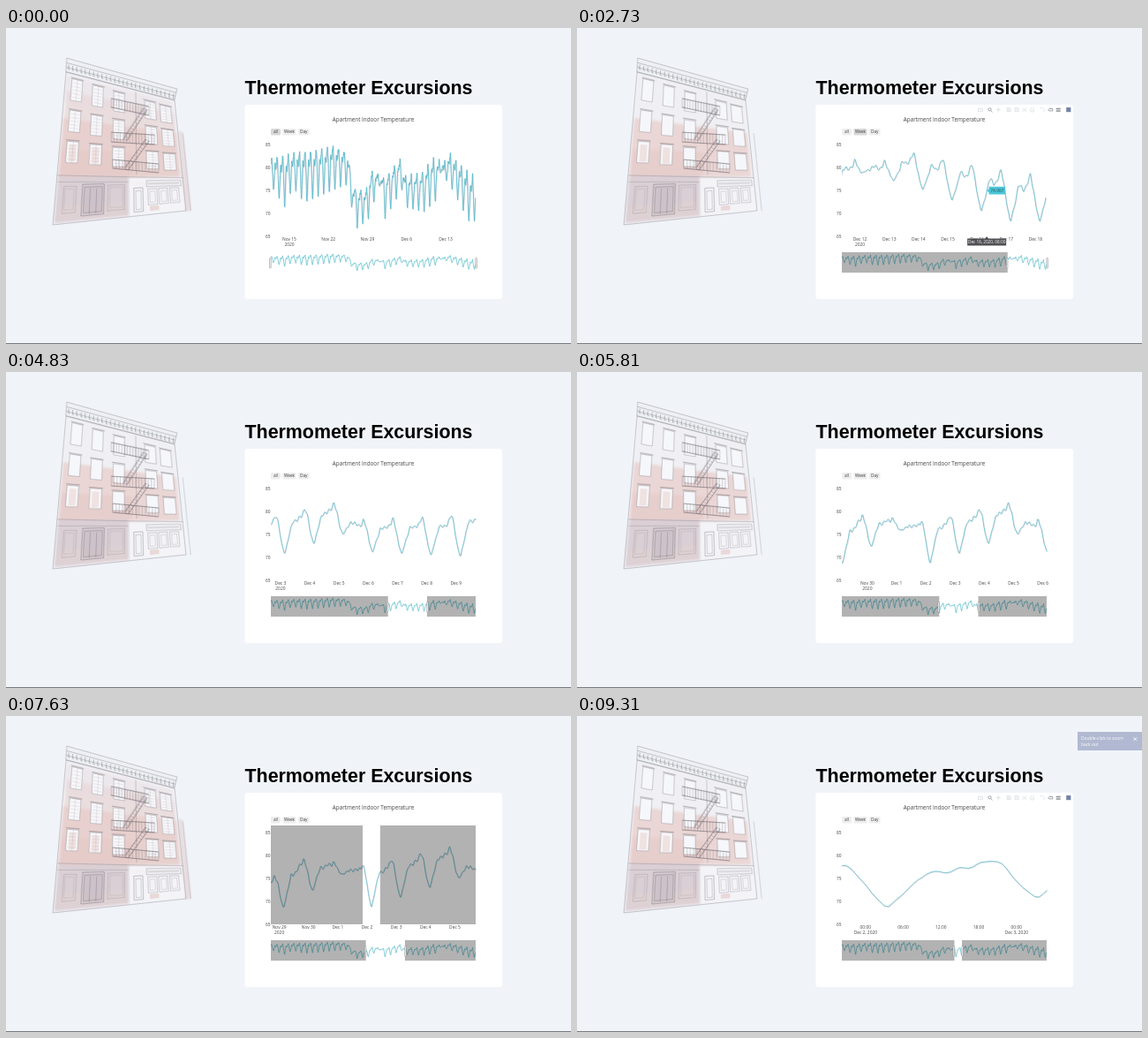
An HTML page for the animation above (9.38 s loop, 640 by 358 pixels).

```html
<!DOCTYPE html>
<html lang="en">
<head>
<meta charset="utf-8">
<title>Indoor temperature</title>
<style>
html, body { margin: 0; width: 100%; height: 100%; overflow: hidden; background: #f0f4f9; }
svg { display: block; width: 100%; height: 100%; }
text { font-family: "Open Sans", sans-serif; }
.head { font: bold 21.4px "Liberation Sans", Arial, sans-serif; }
.line { fill: none; vector-effect: non-scaling-stroke; stroke-linejoin: round; }
</style>
</head>
<body>
<svg id="stage" viewBox="0 0 640 358">
  <defs>
    <clipPath id="plotClip"><rect x="300" y="124" width="232.5" height="112"/></clipPath>
    <clipPath id="miniClip"><rect x="300" y="253" width="232.5" height="25"/></clipPath>
    <filter id="soft" x="-10%" y="-10%" width="120%" height="120%"><feGaussianBlur stdDeviation="1.4"/></filter>
  </defs>
</svg>
<script>
const LOOP = 9380, STEP = 70;
const L = 300, W = 232, DAYS = 36.7, MINI = W / DAYS;
const SUNDAY = 3.32, SUNDAY_MS = Date.UTC(2020, 10, 15), MINUTE = 6e4;
const stage = document.getElementById('stage');

function set(el, attrs) { for (const k in attrs) el.setAttribute(k, attrs[k]); }
function add(parent, tag, attrs = {}, text) {
  const el = document.createElementNS('http://www.w3.org/2000/svg', tag);
  set(el, attrs);
  if (text !== undefined) el.textContent = text;
  return parent.appendChild(el);
}
const show = (el, on) => { el.style.display = on ? '' : 'none'; };
const group = (parent, attrs) => add(parent, 'g', attrs);
const rect = (parent, x, y, width, height, fill, more) =>
  add(parent, 'rect', { x, y, width, height, fill, ...more });
const label = (parent, x, y, text, size = 4.9, fill = '#444', anchor = 'middle') =>
  add(parent, 'text', { x, y, 'font-size': size, fill, 'text-anchor': anchor }, text);
const mix = (a, b, k) => a + (b - a) * k;
const ramp = (t, from, to) => Math.min(1, Math.max(0, (t - from) / (to - from)));
function along(keys, x) {
  const i = Math.max(1, keys.findIndex(k => x <= k[0]));
  if (x > keys[keys.length - 1][0]) return keys[keys.length - 1][1];
  const [a, b] = [keys[i - 1], keys[i]];
  return mix(a[1], b[1], ramp(x, a[0], b[0]));
}
let seed = 7;
const rnd = () => (seed = (seed * 16807) % 2147483647) / 2147483647;

// Temperature: a daily swing between a slow low and a slow high
const LOW_HOUR = .46;
const lows = [[0, 75], [2, 71], [3.5, 75.5], [5.5, 72], [13, 76], [15, 66.5], [17, 68.5], [19, 76],
  [20, 68.5], [23, 75], [24, 71], [27, 70], [29, 72.3], [30, 79], [32, 75], [35, 68]];
const highs = [[0, 82], [11, 85], [13.8, 83.5], [14.6, 76], [17, 75.3], [18.1, 79.5], [20, 78],
  [21.2, 79.5], [23.1, 82], [24, 78], [27, 79], [28.9, 82], [31, 80.5], [32, 83], [36, 78]];
const swing = [[0, 0], [.17, .45], [.27, .78], [.44, .7], [.69, 1], [.8, .68], [.9, .28], [1, 0]];
function tempAt(d) {
  const day = d - LOW_HOUR, part = along(swing, day - Math.floor(day));
  const flicker = .5 * Math.sin(d * 19) + .4 * Math.sin(d * 43);
  return mix(along(lows, day), along(highs, d), part) + part * flicker;
}
const yAt = d => 236 - (tempAt(d) - 65) * 5.2;
const trace = 'M' + Array.from({ length: DAYS * 36 }, (_, i) =>
  (i / 36).toFixed(3) + ' ' + yAt(i / 36).toFixed(2)).join('L');

// Brownstone sketch, mapped on a leaning four-sided front
const house = group(stage);
const at = (u, v) => [mix(mix(68, 191, u), mix(53, 204, u), v), mix(mix(50, 82, u), mix(223, 207, u), v)];
const path = (...pts) => 'M' + pts.map(p => at(...p).map(n => n.toFixed(1)).join(' ')).join('L');
const quad = (u0, v0, u1, v1) => path([u0, v0], [u1, v0], [u1, v1], [u0, v1]) + 'Z';
const fill = (g, d, color, opacity = 1) => add(g, 'path', { d, fill: color, opacity });
function ink(g, d, width = .5, color = '#858088', opacity = .55) {
  for (let i = 0; i < 2; i++) add(g, 'path', {
    d, fill: 'none', stroke: color, 'stroke-width': width, opacity: opacity / (i + 1),
    transform: `translate(${(rnd() - .5) * i * 1.6} ${(rnd() - .5) * i * 1.6})`
  });
}
const seg = (x0, y0, x1, y1) => `M${x0} ${y0}L${x1} ${y1}`;

fill(house, 'M69 34L194 69L191 83L67 51Z', '#edf0f4');
fill(house, quad(0, 0, 1, 1), '#f0f0f4');
const base = group(house, { filter: 'url(#soft)' });
fill(base, quad(.01, .3, .98, .69), '#e9d0cd', .8);
fill(base, quad(.02, .5, .6, .68), '#e2c3c0', .45);
fill(base, quad(.01, .68, .57, .99), '#d8ced3', .95);
fill(base, quad(.03, .88, .55, .98), '#e2d1d0', .6);
const wash = group(house, { filter: 'url(#soft)' });
fill(wash, quad(.02, .12, .98, .69), '#e5c9c7', .5);
fill(wash, quad(.01, .02, .97, .2), '#e9dde0', .5);
fill(wash, 'M195 116L200 118L210 207L203 208Z', '#e6dadc', .9);
fill(wash, quad(.6, .72, .98, .8), '#e6d2d2', .4);

const panes = group(house), blinds = group(house), lines = group(house);
for (let row = 0; row < 3; row++) {
  for (const u0 of [.06, .25, .44, .72, .86]) {
    const u1 = u0 + .097, v0 = .03 + row * .208 + .05 * u0, v1 = v0 + .143;
    fill(panes, quad(u0, v0, u1, v1), '#f6f7fa');
    if (row === 2 && u0 < .3) fill(panes, quad(u0 + .02, v0 + .02, u1 - .02, v1 - .01), '#eddcda', .8);
    ink(panes, quad(u0, v0, u1, v1));
    ink(panes, path([u0 - .01, v0 - .008], [u1 + .01, v0 - .008]), .8);
    for (let k = 1; k < 6; k++) {
      const v = mix(v0, v1, k / 6);
      ink(blinds, path([u0 + .012, v], [u1 - .012, v]), .4, '#c4b3b7', .5);
    }
    ink(blinds, path([u0 + .05, v0], [u0 + .05, v1]), .4, '#c4b3b7', .6);
  }
}
// Cornice
for (let k = 0; k < 4; k++) {
  const y = 34 + k * 5.2;
  ink(lines, seg(69 - k * .4, y, 194 - k, y + 35 - k), .55);
}
for (let k = 0; k < 26; k++) ink(lines, `M${71 + k * 4.75} ${41.5 + k * 1.32}l-.6 5l1.8 .5`, .6, '#6f6b73', .5);
ink(lines, seg(69, 34, 68, 50) + seg(194, 69, 191, 82));
// Walls and street level
ink(lines, quad(0, 0, 1, 1));
ink(lines, seg(200, 119, 209, 207), .4);
ink(lines, path([0, .675], [.57, .69], [1, .7]));
ink(lines, path([.01, .72], [.57, .73]), .4);
fill(lines, quad(.58, .71, .99, .99), '#f5f6f9', .8);
const frame = (u0, v0, u1, v1, width) => {
  ink(lines, quad(u0, v0, u1, v1), width);
  ink(lines, quad(u0 + .015, v0 + .02, u1 - .015, v1 - .02), width * .7);
};
fill(lines, quad(.22, .75, .37, .95), '#c9bec5', .8);
frame(.21, .74, .38, .96, .8);
ink(lines, path([.27, .77], [.27, .95]) + path([.32, .77], [.32, .95]), .6);
frame(.06, .75, .16, .93, .35);
frame(.41, .75, .54, .94, .35);
frame(.61, .78, .68, .97, .6);
frame(.71, .72, .98, .77, .5);
for (let k = 0; k < 3; k++) frame(.72 + k * .085, .79, .79 + k * .085, .92, .45);
fill(lines, quad(.73, .93, .8, .97), '#e6d2d0', .8);
// Fire escape
const iron = '#68636b';
function ladder(n, x0, y0, x1, y1, dx, dy) {
  ink(lines, seg(x0, y0, x1, y1) + seg(x0 + dx, y0 + dy, x1 + dx, y1 + dy), .7, iron, .65);
  for (let k = 0; k <= n; k++) {
    const x = mix(x0, x1, k / n), y = mix(y0, y1, k / n);
    ink(lines, seg(x, y, x + dx, y + dy), .35, iron, .5);
  }
}
ladder(14, 119, 80, 162, 89, 0, 10);
ladder(14, 119, 118, 168, 121, 0, 11);
ladder(14, 121, 149, 173, 154, 0, 10);
ladder(11, 156, 91, 133, 126, 4, 2);
ladder(11, 158, 126, 134, 159, 4, 2);
ink(lines, seg(147, 72, 148, 166), .4, iron, .5);

// Card
add(stage, 'text', { x: 270.5, y: 75, class: 'head', fill: '#000' }, 'Thermometer Excursions');
rect(stage, 270.5, 87, 291.5, 220, '#fff', { rx: 3 });
label(stage, 416, 105.6, 'Apartment Indoor Temperature', 6.3);
const buttons = [['all', 300, 11], ['Week', 313.5, 15], ['Day', 331, 12.5]].map(([name, x, w]) => {
  const back = rect(stage, x, 114, w, 7.4, '#eee', { rx: 1.2 });
  label(stage, x + w / 2, 119.4, name, 4.8);
  return back;
});
for (let v = 65; v <= 85; v += 5) label(stage, 299.5, 237.8 - (v - 65) * 5.2, v, 4.8, '#444', 'end');

const plot = group(stage, { 'clip-path': 'url(#plotClip)' });
const glow = add(plot, 'path', { d: trace, class: 'line', stroke: '#e2dbe4', 'stroke-width': 1.2 });
const main = add(plot, 'path', { d: trace, class: 'line', stroke: '#4fbacb' });
const mini = group(stage, { 'clip-path': 'url(#miniClip)' });
add(mini, 'path', {
  d: trace, class: 'line', stroke: '#4fb8c9', 'stroke-width': .75,
  transform: `matrix(${MINI} 0 0 .205 ${L} ${254 - 124 * .205})`
});
const shade = (y, h) => [0, 1].map(() => rect(stage, L, y, 0, h, '#000', { opacity: .3 }));
const miniShade = shade(254, 23.2), plotShade = shade(124, 112);
function cover(pair, x0, x1) {
  set(pair[0], { width: Math.max(0, x0 - L) });
  set(pair[1], { x: x1, width: Math.max(0, L + W - x1) });
}
const grips = [0, 1].map(() =>
  rect(stage, 0, 260.5, 1.6, 11.5, '#fff', { rx: .6, stroke: '#777', 'stroke-width': .5 }));
const ticks = Array.from({ length: 9 }, () => [label(stage, 0, 241.4, ''), label(stage, 0, 247, '')]);

// Mode bar
const bar = group(stage, { fill: 'none', 'stroke-width': .8 });
const icon = (x, d, on) => add(bar, 'path', { d, transform: `translate(${x} 92.7)`, stroke: on ? '#8b8f95' : '#d9dbdf' });
const box = 'M-2 -2H2V2H-2Z', dash = 'M-1.2 0H1.2', plus = dash + 'M0 -1.2V1.2';
icon(457, 'M-2.4 -1.6H2.4V2H-2.4ZM-.6 .2H.6');
icon(468, 'M1.1 -.4A1.6 1.6 0 1 1 -2.1 -.4A1.6 1.6 0 1 1 1.1 -.4M.6 .8L2.5 2.6', true);
icon(477.3, 'M-2.6 0H2.6M0 -2.6V2.6');
icon(489, box + plus);
icon(498, box + dash);
icon(506.8, 'M-2.2 -2.2L2.2 2.2M2.2 -2.2L-2.2 2.2');
icon(515.5, 'M-2.5 .2L0 -2.2L2.5 .2M-1.6 0V2.2H1.6V0');
icon(527, 'M-2 -2H.5M2 -1V2');
icon(536.3, 'M-2.5 0L-1.5 -1.2H2.5V1.2H-1.5Z', true);
icon(545.2, 'M-2.5 -1.2H2.5M-2.5 1.3H2.5', true).setAttribute('stroke-width', 1.5);
rect(bar, 554.2, 90, 5.2, 5.2, '#7484a8');

// Hover labels
const hover = group(stage);
const tip = group(hover);
add(tip, 'path', { d: 'M0 0L2.4 -2V-4.4H21V4.4H2.4V2Z', fill: '#4cc6d7' });
const tipText = label(tip, 11.8, 1.8, '', 4.9, '#28505a');
const axisTip = group(hover);
add(axisTip, 'path', { d: 'M0 236.3L2 238.6H22V246.4H-22V238.6H-2Z', fill: '#505054' });
const axisText = label(axisTip, 0, 244.3, '', 4.7, '#fff');

const toast = group(stage);
rect(toast, 567, 18, 73, 21, '#b1b9d2');
label(toast, 571, 26.6, 'Double-click to zoom', 4.9, '#fff', 'start');
label(toast, 571, 33.8, 'back out', 4.9, '#fff', 'start');
add(toast, 'path', { d: 'M630.6 24.4l3.4 3.4m0 -3.4l-3.4 3.4', stroke: '#fff', 'stroke-width': 1 });
rect(stage, 0, 357, 640, 1, '#77797d');

const clock = d => new Date(SUNDAY_MS + Math.round((d - SUNDAY) * 1440) * MINUTE);
const dayName = c => `${c.getUTCMonth() === 10 ? 'Nov' : 'Dec'} ${c.getUTCDate()}`;
const hour = c => String(c.getUTCHours()).padStart(2, '0') + ':00';

function drawTicks(a, b) {
  const span = b - a, step = span > 10 ? 7 : span > 2 ? 1 : .25, fine = step < 1;
  const first = Math.ceil((a - SUNDAY) / step - 1e-6);
  ticks.forEach(([top, low], i) => {
    const d = SUNDAY + (first + i) * step, c = clock(d), x = L + (d - a) / span * W;
    set(top, { x });
    set(low, { x });
    show(top, d <= b);
    show(low, d <= b && (i === 0 || fine && c.getUTCHours() === 0));
    top.textContent = fine ? hour(c) : dayName(c);
    low.textContent = fine ? dayName(c) + ', 2020' : '2020';
  });
}

function draw(t) {
  const within = (from, to) => t > from && t < to;
  const whole = t < 1.95, zoomed = t > 8.15;
  const start = mix(17.03, 29.7, (1 - ramp(t, 3, 6)) ** 1.235);
  const [a, b] = whole ? [0, DAYS] : zoomed ? [20.163, 21.52] : [start, start + 7];
  const scale = W / (b - a), shift = L - a * scale;
  set(main, { transform: `matrix(${scale} 0 0 1 ${shift} 0)`, 'stroke-width': whole ? .8 : .7 });
  set(glow, { transform: `matrix(${scale} 0 0 1 ${shift + .5} .5)` });
  drawTicks(a, b);

  const x0 = L + a * MINI, x1 = L + b * MINI;
  cover(miniShade, x0, x1);
  set(grips[0], { x: x0 - 1.4 });
  set(grips[1], { x: x1 - .2 });
  const pulling = within(7.1, 8.15);
  plotShade.forEach(s => show(s, pulling));
  cover(plotShade, 404, mix(404, 449, ramp(t, 7.1, 8.15) ** 1.2));

  set(buttons[0], { fill: whole ? '#d9d9d9' : '#eee' });
  set(buttons[1], { fill: within(1.75, 3) ? '#d9d9d9' : '#eee' });
  show(bar, within(1.4, 3.05) || within(6.05, 7.1) || t > 8.25);

  const hovering = within(2.15, 2.9) || within(6.3, 7.1);
  show(hover, hovering);
  if (hovering) {
    const mouse = t < 3 ? mix(325, 500, ramp(t, 2.15, 2.88)) : mix(446, 404, ramp(t, 6.3, 7.07) ** 4);
    const d = SUNDAY + Math.round((a + (mouse - L) / scale - SUNDAY) * 24) / 24;
    const x = L + (d - a) * scale, c = clock(d);
    set(tip, { transform: `translate(${x} ${yAt(d)})` });
    set(axisTip, { transform: `translate(${x} 0)` });
    tipText.textContent = tempAt(d).toFixed(3);
    axisText.textContent = `${dayName(c)}, 2020, ${hour(c)}`;
  }
  set(toast, { opacity: ramp(t, 8.15, 8.75) });

  const tint = 1 - ramp(t, 1.3, 2.8) + ramp(t, 6.4, 7.4) - ramp(t, 8.3, 9.2);
  set(wash, { opacity: tint });
  set(blinds, { opacity: tint });
}

const begin = performance.now();
function tick() {
  const ms = (performance.now() - begin) % LOOP;
  draw(Math.floor(ms / STEP) * STEP / 1000);
  requestAnimationFrame(tick);
}
tick();
</script>
</body>
</html>
```
